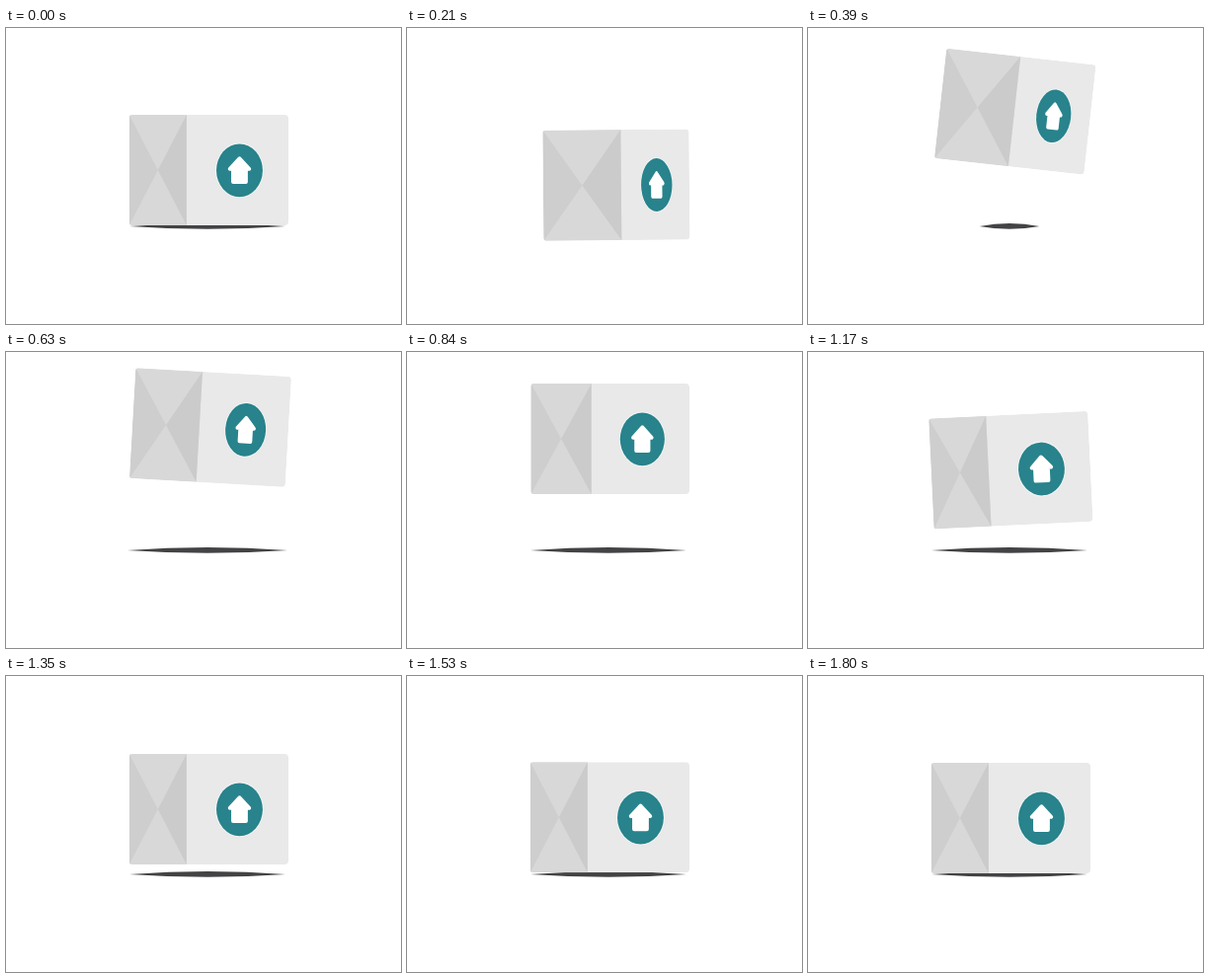
Recreate the animation shown at these times as an HTML page with a canvas. Size 400 by 300 pixels, loop 1830 ms.

```html
<!DOCTYPE html>
<html lang="en">
<head>
<meta charset="utf-8">
<title>Floating box</title>
<style>
  html, body { margin: 0; width: 100%; height: 100%; overflow: hidden; background: #fff; }
  canvas { display: block; width: 400px; height: 300px; }
</style>
</head>
<body>
<canvas id="stage" width="400" height="300"></canvas>
<script>
const ctx = document.getElementById('stage').getContext('2d');
const LOOP = 1830, STEP = 30;
const FRONT = 132.4, DEPTH = 92.5, HEIGHT = 112, RIGHT = 286;
const rad = deg => deg * Math.PI / 180;

const progress = (t, from, to) => Math.min(1, Math.max(0, (t - from) / (to - from)));
const ease = (t, from, to) => (1 - Math.cos(Math.PI * progress(t, from, to))) / 2;

// Shoots up from below the stage, then sinks to the ground
const height = t => 75.3 + 281 * (1 - progress(t, 30, 540)) ** 2.78 + 68.7 * ease(t, 540, 1600);
// Turns about its upright axis
const turn = t => rad(60 - 21.2 * ease(t, 30, 1080));
// Rocks right, level, left, level
const tilt = t => rad(-6 + 12.5 * ease(t, 30, 420) - 6.5 * ease(t, 420, 840)
  - 4 * ease(t, 840, 1060) + 4 * ease(t, 1060, 1350));
// Shadow grows past its size and settles
const spread = t => 88 * ease(t, 330, 480) - 9 * ease(t, 480, 700);

function polygon(color, ...pts) {
  ctx.fillStyle = color;
  ctx.beginPath();
  pts.forEach(([x, y]) => ctx.lineTo(x, y));
  ctx.closePath();
  ctx.fill();
}

function ellipse(color, rx, ry) {
  ctx.fillStyle = color;
  ctx.beginPath();
  ctx.ellipse(0, 0, rx, ry, 0, 0, Math.PI * 2);
  ctx.fill();
}

function drawShadow(rx) {
  const x = 204, y = 200.9, bend = 5.6;
  ctx.fillStyle = '#434345';
  ctx.beginPath();
  ctx.moveTo(x - rx, y);
  ctx.quadraticCurveTo(x, y - bend, x + rx, y);
  ctx.quadraticCurveTo(x, y + bend, x - rx, y);
  ctx.fill();
}

function drawSide(x, w) {
  const top = -HEIGHT / 2, bottom = HEIGHT / 2, mid = [x + w / 2, 0];
  ctx.fillStyle = '#d8d8d8';
  ctx.fillRect(x, top, w, HEIGHT);
  polygon('#cecece', [x, top], mid, [x, bottom]);
  polygon('#cbcbcb', [x + w, top], mid, [x + w, bottom]);
}

function drawLabel(x, squash) {
  ctx.save();
  ctx.translate(x, 0.3);
  ctx.scale(squash, 1);
  ellipse('#f5f5f5', 24.4, 27.9);
  ellipse('#28838c', 23.4, 26.9);
  ctx.lineJoin = 'round';
  ctx.lineWidth = 4;
  ctx.strokeStyle = '#fff';
  polygon('#fff', [0, -12], [9.7, -1.5], [6.4, -1.5], [6.4, 11.8], [-6.4, 11.8], [-6.4, -1.5], [-9.7, -1.5]);
  ctx.stroke();
  ctx.restore();
}

function drawBox(t) {
  const front = FRONT * Math.cos(turn(t)), side = DEPTH * Math.sin(turn(t));
  const w = front + side, x = -w / 2;
  ctx.save();
  ctx.translate(RIGHT - w / 2, height(t));
  ctx.rotate(tilt(t));
  ctx.beginPath();
  ctx.roundRect(x, -HEIGHT / 2, w, HEIGHT, [3, 4, 4, 3]);
  ctx.clip();
  ctx.fillStyle = '#e9e9e9';
  ctx.fillRect(x, -HEIGHT / 2, w, HEIGHT);
  drawSide(x, side);
  drawLabel(x + side + front * 0.52, front / 103);
  ctx.restore();
}

function draw(t) {
  ctx.fillStyle = '#fff';
  ctx.fillRect(0, 0, 400, 300);
  drawShadow(spread(t));
  drawBox(t);
}

const start = performance.now();
function tick(now) {
  const t = Math.floor(Math.max(0, now - start) % LOOP / STEP) * STEP;
  // The loop opens on the box still at rest
  draw(t || LOOP);
  requestAnimationFrame(tick);
}
tick(start);
</script>
</body>
</html>
```
